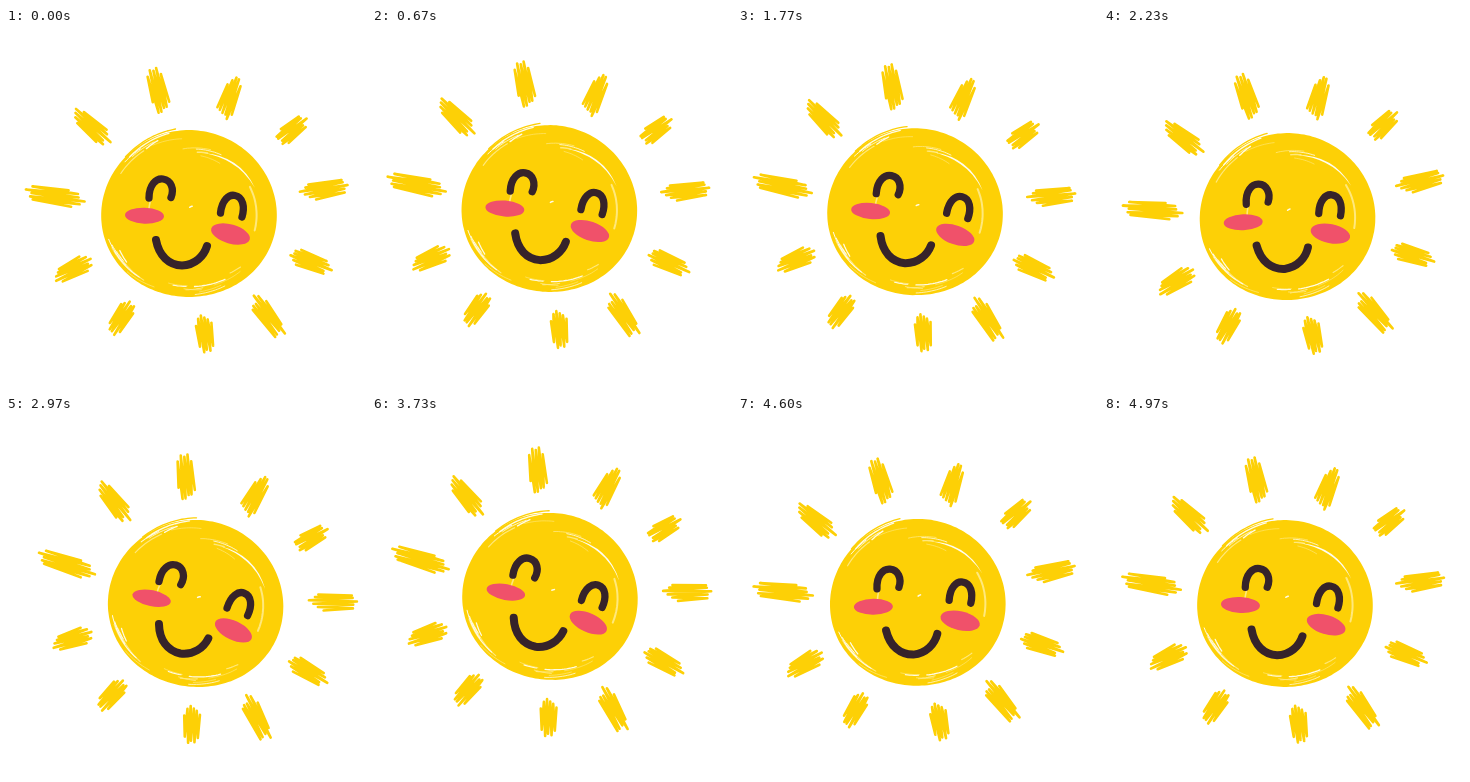
An HTML page that plays this animation: 360x360 px, repeating every 5.01 s.

```html
<!DOCTYPE html>
<html lang="en">
<head>
<meta charset="utf-8">
<title>Smiling sun</title>
<style>
  html, body { margin: 0; width: 100%; height: 100%; overflow: hidden; background: #fff; }
  svg { display: block; width: 100vw; height: 100vh; }
  path { stroke-linecap: round; stroke-linejoin: round; }
</style>
</head>
<body>
<svg viewBox="0 0 360 360">
  <g id="sun">
    <g id="rays" fill="none"></g>
    <g id="disc" fill="none"></g>
    <path d="M198 125Q234 128 249 160Q239 143 225 135Q214 128 198 125Z" fill="#fffdf0"/>
    <g fill="#f0516a">
      <ellipse cx="138.500" cy="187.700" rx="19.500" ry="8" transform="rotate(2 138.500 187.700)"/>
      <ellipse cx="224.500" cy="206" rx="20" ry="9.500" transform="rotate(16 224.500 206)"/>
    </g>
    <g fill="none" stroke="#36232a" stroke-width="7.300">
      <path d="M143 170C143 157 150 150 157 151C165 152 168.500 161 165 169.500"/>
      <path d="M214.500 185C216 172 223 166 229 167.500C237 169 239 179 236 189"/>
      <path d="M150 212C153 228 163 237 176 237.500C189 237 198 228 201 218" stroke-width="8"/>
    </g>
  </g>
</svg>
<script>
const CX = 183, CY = 186, LOOP = 5010, STEP = 100 / 3, LAST = 149;
const YELLOW = '#fdd006', PALE = '#ffe87c', WHITE = '#fffbe6';
const RAD = Math.PI / 180;

let seed = 11;
const rand = () => (seed = (seed * 16807) % 2147483647) / 2147483647;
const between = (a, b) => a + (b - a) * rand();

function drawLine(parent, points, attrs) {
  const el = document.createElementNS('http://www.w3.org/2000/svg', 'path');
  el.setAttribute('d', 'M' + points.map(p => p.map(v => v.toFixed(1)).join(' ')).join('L'));
  for (const name in attrs) el.setAttribute(name, attrs[name]);
  document.getElementById(parent).append(el);
}

// centre and length of each ray, clockwise from the top
const rays = [
  [152, 62, 52], [223, 71, 45], [286, 102, 36], [320, 161, 54], [305, 234, 43], [262, 289, 52],
  [199, 307, 41], [115, 290, 40], [67, 241, 43], [48, 168, 62], [85, 99, 48]
];

// zigzag along the line from the disc's centre, ragged at both ends
function scribble([x, y, length]) {
  const angle = Math.atan2(y - CY, x - CX), c = Math.cos(angle), s = Math.sin(angle);
  const count = 10, points = [];
  for (let i = 0; i <= count; i++) {
    const k = i / count * 2 - 1;
    const u = (i % 2 ? 1 : -1) * length / 2 * (1 - 0.4 * k * k) * between(0.68, 1.05);
    const v = k * 8 + between(-0.5, 0.5);
    points.push([x + u * c - v * s, y + u * s + v * c]);
  }
  drawLine('rays', points, { stroke: YELLOW, 'stroke-width': 2.6 });
}

const edge = a => 85.6 + 2.2 * Math.cos(2 * a * RAD) + 0.5 * Math.sin(3 * a * RAD);

// curve around the disc; share is its part of the full radius, drift its change on the way
function arc(from, to, share, drift, attrs) {
  const points = [], span = to - from;
  for (let i = 0, n = Math.ceil(span / 2); i <= n; i++) {
    const a = from + span * i / n;
    const r = edge(a) * (share + drift * i / n);
    points.push([CX + r * Math.cos(a * RAD), CY + r * Math.sin(a * RAD)]);
  }
  drawLine('disc', points, attrs);
}

function scratches(count, from, to, inner, outer) {
  for (let i = 0; i < count; i++) {
    const start = between(from, to);
    arc(start, start + between(8, 26), between(inner, outer), between(-0.02, 0.03),
      { stroke: rand() < 0.5 ? WHITE : PALE, 'stroke-width': between(0.6, 1.4) });
  }
}

function drawDisc() {
  arc(0, 360, 1, 0, { fill: YELLOW });
  arc(222, 261, 1, 0.025, { stroke: YELLOW, 'stroke-width': 1.3 });
  arc(224, 256, 0.965, 0.025, { stroke: WHITE, 'stroke-width': 1.3 });
  scratches(5, 205, 245, 0.92, 0.97);
  scratches(8, 110, 160, 0.9, 0.97);
  scratches(9, 45, 95, 0.86, 0.96);
  scratches(4, 248, 285, 0.7, 0.8);
  arc(-24, 14, 0.77, 0, { stroke: PALE, 'stroke-width': 2 });
  arc(186, 202, 0.46, 0.01, { stroke: PALE, 'stroke-width': 1.6 });
  arc(276, 292, 0.08, 0.02, { stroke: WHITE, 'stroke-width': 1.5 });
}

// turning points of each movement: time, value
const shiftX = [[0, 0], [800, -6], [1170, 0.5], [1700, -6], [2800, 7.5], [3950, -6], [5000, -2]];
const shiftY = [[0, 0], [700, -5], [1500, -4], [2200, 3], [2750, 4.5], [3400, -6], [5000, 2]];
const turn = [[0, 0], [600, 3], [1200, -4.6], [1700, 4], [2230, -4.6],
  [2950, 9.5], [3700, 8.5], [4250, -6], [5000, 1]];

function swing(track, time) {
  const i = track.findIndex(point => point[0] > time);
  const [t0, a] = track[i - 1], [t1, b] = track[i];
  return a + (b - a) * (1 - Math.cos(Math.PI * (time - t0) / (t1 - t0))) / 2;
}

const sun = document.getElementById('sun');
const start = performance.now();

function draw() {
  const elapsed = Math.max(0, performance.now() - start) % LOOP;
  const time = Math.min(Math.floor((elapsed + 5) / STEP), LAST) * STEP;
  const [x, y, angle] = [shiftX, shiftY, turn].map(track => swing(track, time));
  sun.setAttribute('transform', `translate(${x} ${y}) rotate(${angle} ${CX} ${CY})`);
  requestAnimationFrame(draw);
}

rays.forEach(scribble);
drawDisc();
draw();
</script>
</body>
</html>
```
